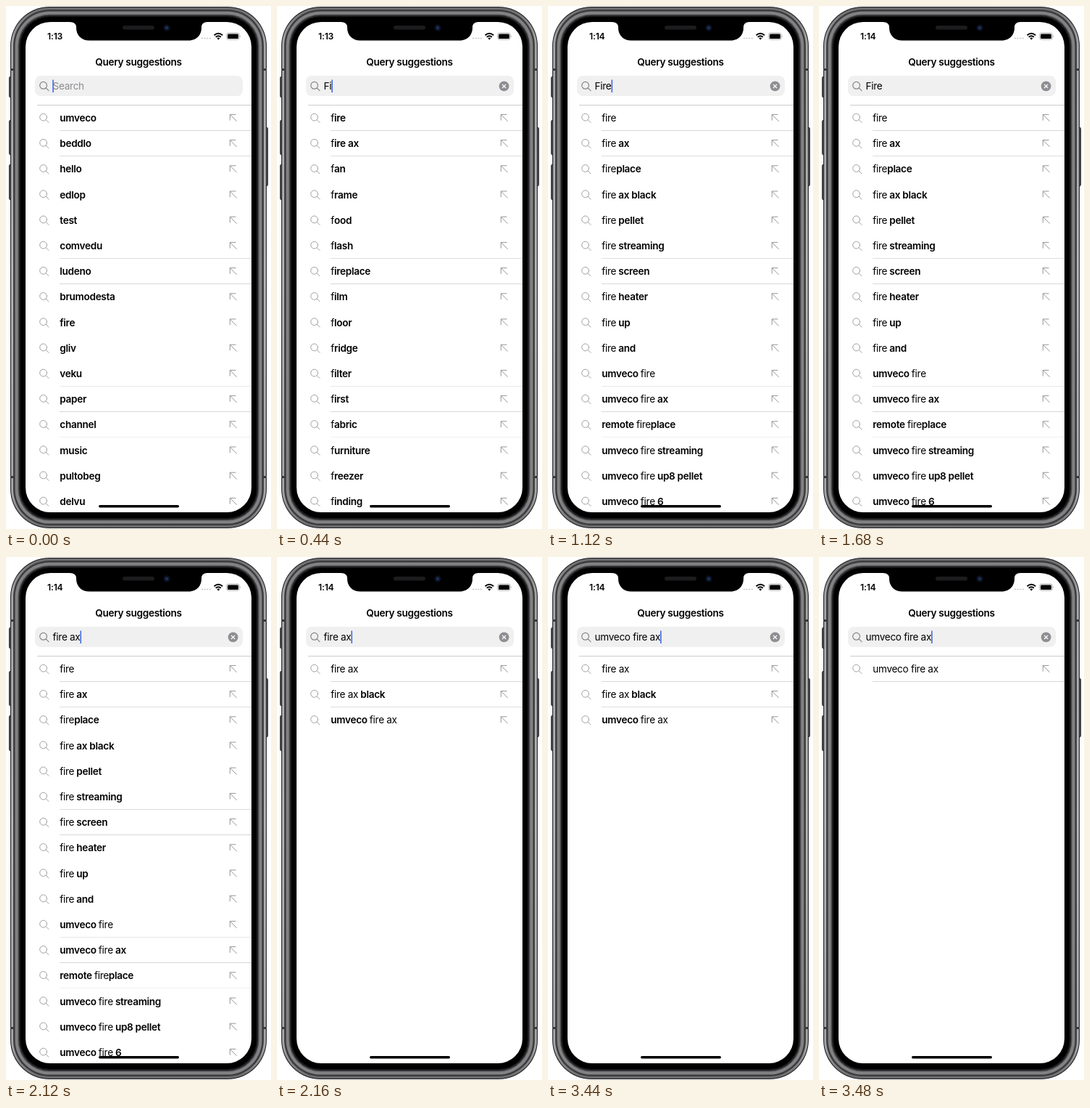
An HTML page for the animation above (3.56 s loop, 366 px wide and 720 px high).

```html
<!DOCTYPE html>
<html lang="en">
<head>
<meta charset="utf-8">
<title>Query suggestions</title>
<style>
  html, body { margin: 0; width: 100%; height: 100%; overflow: hidden; background: #fff; }
  svg { display: block; width: 100vw; height: 100vh; }
  text { font: 400 13.6px Inter, "Open Sans", sans-serif; letter-spacing: -0.31px; white-space: pre; }
  .b { font-weight: 600; }
</style>
</head>
<body>
<svg viewBox="0 0 366 720" xmlns="http://www.w3.org/2000/svg">
  <defs>
    <clipPath id="clip"><rect x="27" y="22" width="312" height="675" rx="34"/></clipPath>
    <linearGradient id="metal" x1="0" y1="0" x2="0" y2="1">
      <stop offset="0" stop-color="#6a6a6c"/>
      <stop offset=".06" stop-color="#a2a2a4"/>
      <stop offset=".5" stop-color="#b2b2b4"/>
      <stop offset=".94" stop-color="#a2a2a4"/>
      <stop offset="1" stop-color="#6a6a6c"/>
    </linearGradient>
    <g id="lens" fill="none" stroke-linecap="round">
      <circle cx="51.6" cy="-1.1" r="4.9"/>
      <path d="M55.2 2.5L59 6.3"/>
    </g>
    <path id="arrow" d="M317.5 -4.8H309.3V3.4M309.3 -4.8L318.7 4.6" fill="none" stroke="#969698"/>
  </defs>

  <g id="phone">
    <g fill="#6a6a6c" stroke="#1b1b1d">
      <rect x="4.5" y="97.5" width="4" height="28" rx="1"/>
      <rect x="4.5" y="157.5" width="4" height="47" rx="1"/>
      <rect x="4.5" y="218.5" width="4" height="48" rx="1"/>
      <rect x="357.5" y="167.5" width="4" height="80" rx="1"/>
    </g>
  </g>

  <g clip-path="url(#clip)">
    <rect x="27" y="22" width="312" height="675" fill="#fff"/>
    <text class="b" x="183" y="82" text-anchor="middle">Query suggestions</text>
    <rect x="40" y="96" width="287" height="28" rx="8" fill="#f0f0f1"/>
    <use href="#lens" y="110.4" stroke="#858589" stroke-width="1.2"/>
    <text id="field" x="64.6" y="115"></text>
    <rect id="caret" y="101.5" width="1.6" height="17.5" fill="#4169e1"/>
    <g id="clear">
      <circle cx="313.6" cy="110.4" r="6.9" fill="#8e8e93"/>
      <path d="M311 107.8l5.2 5.2m0-5.2l-5.2 5.2" stroke="#fff" stroke-width="1.2"/>
    </g>
    <path d="M43 136.5H339" stroke="#cdcdcf"/>
    <g id="rows"></g>
    <rect x="128" y="687" width="111" height="3.5" rx="1.7"/>
  </g>

  <path d="M88 21H278V22C273 22 270 25 270 29V30C270 40 263 47.5 252 47.5H115C104 47.5 97 40 97 30V29C97 25 94 22 88 22Z"/>
  <rect x="161" y="27" width="44" height="5.5" rx="2.7" fill="#1c1c1e"/>
  <circle cx="222" cy="30" r="4.5" fill="#0c1222"/>
  <circle cx="222" cy="30" r="2" fill="#1d3563"/>

  <text id="clock" class="b" x="57" y="46" style="font-size:12.2px;letter-spacing:-.2px"></text>
  <path d="M270 44.5H283" stroke="#c4c4c6" stroke-width="1.6" stroke-dasharray="2 1.6"/>
  <g fill="none" stroke="#000" stroke-width="1.9">
    <path d="M287.5 40.2Q293.3 35.2 299.1 40.2"/>
    <path d="M289.7 42.7Q293.3 39.7 296.9 42.7"/>
  </g>
  <path d="M291.3 44.4Q293.3 42.8 295.3 44.4L293.3 46.6Z"/>
  <rect x="304.7" y="37.2" width="17.6" height="9" rx="2.6" fill="none" stroke="#a2a2a4" stroke-width=".9"/>
  <rect x="306" y="38.5" width="15" height="6.4" rx="1.5"/>
  <path d="M323.4 40.2q1.4 1.5 0 3z" fill="#a2a2a4"/>
</svg>
<script>
const $ = id => document.getElementById(id);
const LOOP = 3560, PITCH = 35.2, TOP = 154.2;
const list = s => s.split(',');

const fireRows = 'fire pellet,fire streaming,fire screen,fire heater,fire up';
const lists = {
  '': list('umveco,beddlo,hello,edlop,test,comvedu,ludeno,brumodesta,fire,gliv,veku,paper,channel,music,pultobeg,delvu'),
  f: list('fire,fire ax,fan,frame,food,flash,fireplace,film,floor,fridge,filter,first,fabric,furniture,freezer,finding'),
  fi: list('fire,fire ax,fireplace,first,fingerprint,filament,fire ax black,file,filter,finding,figure,' + fireRows),
  fir: list('fire,fire ax,fireplace,first,fire ax black,' + fireRows + ',fire and,umveco fire,umveco fire ax,remote fireplace,umveco fire streaming,umveco fire up8 pellet'),
  fire: list('fire,fire ax,fireplace,fire ax black,' + fireRows + ',fire and,umveco fire,umveco fire ax,remote fireplace,umveco fire streaming,umveco fire up8 pellet,umveco fire 6'),
  'fire ax': list('fire ax,fire ax black,umveco fire ax'),
  'umveco fire ax': ['umveco fire ax']
};

// start time, text in the field, query behind the list
const steps = [
  [0, '', ''],
  [40, 'F', ''], [80, 'F', 'f'],
  [440, 'Fi', 'f'], [480, 'Fi', 'fi'],
  [800, 'Fir', 'fi'], [840, 'Fir', 'fir'],
  [1040, 'Fire', 'fir'], [1080, 'Fire', 'fire'],
  [2120, 'fire ax', 'fire'], [2160, 'fire ax', 'fire ax'],
  [3440, 'umveco fire ax', 'fire ax'], [3480, 'umveco fire ax', 'umveco fire ax']
];
// caret fades: start, end, opacity before and after
const fades = [[1520, 1680, 1, 0], [1880, 2000, 0, 1], [2680, 2760, 1, 0], [3000, 3120, 0, 1]];
// divider colour below a row
const dividers = { 0: '#d8d8da', 1: '#dededf', 5: '#dededf', 6: '#d8d8da', 10: '#e8e8ea', 11: '#d8d8da', 12: '#f0f0f1' };

function buildPhone() {
  const rings = [[6, '#1b1b1d'], [7, 'url(#metal)'], [10, '#3c3c3e'], [12.5, '#828284'], [16.5, '#4a4a4c'], [18, '#1c1c1e'], [20, '#000']];
  let out = '';
  for (const [x, fill] of rings) {
    const d = x - 6;
    out += `<rect x="${x}" y="${1 + d}" width="${354 - 2 * d}" height="${718 - 2 * d}" rx="${54 - d}" fill="${fill}"/>`;
  }
  for (const x of [6, 354]) for (const y of [86, 647])
    out += `<rect x="${x}" y="${y}" width="6" height="3" fill="#3a3a3c"/>`;
  $('phone').innerHTML += out;
}

function label(word, query) {
  const at = query ? word.indexOf(query) : -1;
  const bold = s => s && `<tspan class="b">${s}</tspan>`;
  if (at < 0) return bold(word);
  return bold(word.slice(0, at)) + query + bold(word.slice(at + query.length));
}

function rows(query) {
  return lists[query].map((word, i) => {
    const y = TOP + i * PITCH, line = Math.floor(y + 17) + .5;
    const rule = dividers[i] ? `<path d="M74 ${line}H339" stroke="${dividers[i]}"/>` : '';
    return `<use href="#lens" y="${y}" stroke="#a0a0a3"/><use href="#arrow" y="${y}"/>
      <text x="74.3" y="${y + 4.8}">${label(word, query)}</text>${rule}`;
  }).join('');
}

function caretAlpha(t) {
  let a = 1;
  for (const [from, to, before, after] of fades)
    if (t >= from) a = before + (after - before) * Math.min(1, (t - from + 40) / (to - from + 40));
  return a;
}

let shown = null;
function draw(t) {
  const step = steps.filter(s => s[0] <= t).pop();
  if (step !== shown) {
    const [, typed, query] = shown = step;
    const field = $('field');
    field.textContent = typed || 'Search';
    field.setAttribute('fill', typed ? '#000' : '#8b8b90');
    $('clear').style.display = typed ? '' : 'none';
    $('caret').setAttribute('x', typed ? 64.6 + field.getComputedTextLength() : 64.2);
    $('rows').innerHTML = rows(query);
  }
  $('clock').textContent = t < 960 ? '1:13' : '1:14';
  $('caret').setAttribute('opacity', caretAlpha(t));
}

buildPhone();
const start = performance.now();
function tick() {
  draw((performance.now() - start) % LOOP);
  requestAnimationFrame(tick);
}
tick();
</script>
</body>
</html>
```
